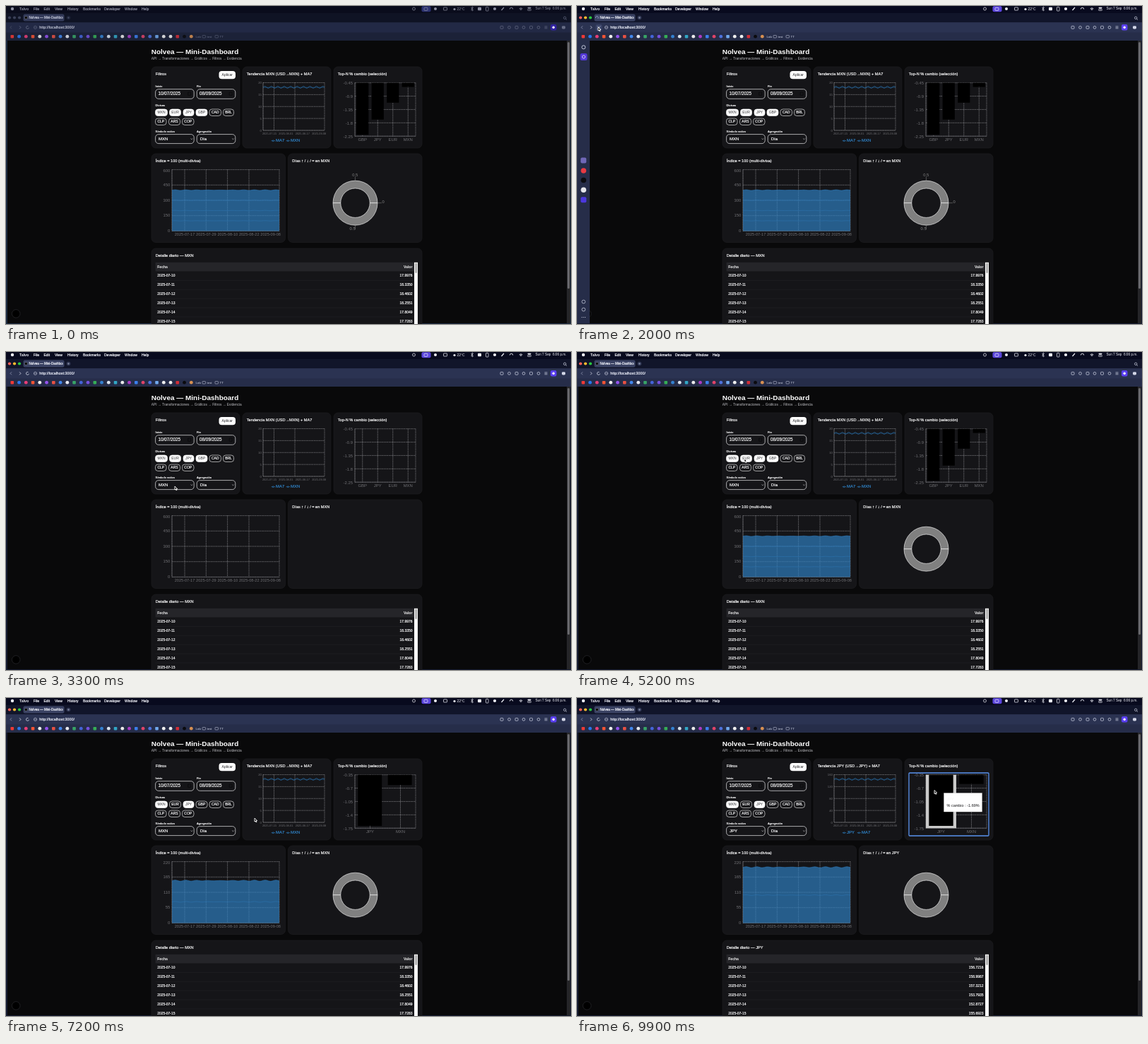
Animation, 800 px wide and 450 px high, one loop 10000 ms. Source, as an HTML page with a canvas:

```html
<!DOCTYPE html>
<html lang="es">
<head>
<meta charset="utf-8">
<title>Mini-Dashboard</title>
<style>
html, body { margin: 0; width: 100%; height: 100%; overflow: hidden; background: #09090a; }
canvas { display: block; width: 800px; height: 450px; }
</style>
</head>
<body>
<canvas id="stage"></canvas>
<script>
const canvas = document.getElementById('stage'), c = canvas.getContext('2d');
const ratio = window.devicePixelRatio || 1;
canvas.width = 800 * ratio;
canvas.height = 450 * ratio;

const LOOP = 10000, CLEARED = 2900, AXES = 3200, LOADED = 3300, FOCUS = 8300, PICK_JPY = 9400;
const BLUE = '#2f7fc1', CARD = '#151518', GRAY = '#707074', GRID = '#c4c4c8';
const CHANGE = { GBP: 2.2, JPY: 1.69, EUR: 1.12, MXN: .59 };
const SETS = [
  { at: LOADED, bars: ['GBP', 'JPY', 'EUR', 'MXN'], stack: ['MXN', 'EUR', 'JPY', 'GBP'], max: 600, step: .45 },
  { at: 5700, bars: ['GBP', 'JPY', 'MXN'], stack: ['MXN', 'JPY', 'GBP'], max: 300, step: .45 },
  { at: 7050, bars: ['JPY', 'MXN'], stack: ['MXN', 'JPY'], max: 220, step: .35 }
];
const CHIPS = [['MXN', 211.5, 17], ['EUR', 231.5, 16], ['JPY', 251, 15], ['GBP', 269, 16], ['CAD', 288, 16.5],
  ['BRL', 307.5, 15], ['CLP', 211.5, 15.5], ['ARS', 230.5, 16], ['COP', 249.5, 16.5]];
const ROWS = {
  MXN: ['17.9976', '18.3350', '18.4602', '18.2551', '17.8049', '17.7283'],
  JPY: ['156.7216', '158.9987', '157.3212', '153.7935', '152.8727', '155.6923']
};
const PATH = [[300, 330, 240], [900, 250, 150], [1800, 30, 30], [2200, 30, 30], [3200, 239, 190], [4600, 239, 190],
  [5100, 237, 151], [5800, 237, 151], [6500, 276, 150], [7050, 278, 151], [7200, 352, 170], [7500, 352, 170],
  [8200, 555.5, 126], [8700, 555.5, 126], [9300, 506, 130.5], [10000, 506, 130.5]];

const clamp = v => Math.max(0, Math.min(1, v));
const mix = (a, b, p) => a + (b - a) * p;

// cubic-bezier(.25, .1, .25, 1)
function ease(x) {
  x = clamp(x);
  if (x === 0 || x === 1) return x;
  let lo = 0, hi = 1, m;
  for (let i = 0; i < 20; i++) {
    m = (lo + hi) / 2;
    if (.75 * m * (1 - m) + m ** 3 < x) lo = m; else hi = m;
  }
  return .3 * m * (1 - m) ** 2 + 3 * m * m * (1 - m) + m ** 3;
}

function text(s, x, y, size, color = '#f4f4f5', { align = 'left', bold = false, medium = false } = {}) {
  c.font = `${bold ? 'bold ' : ''}${size}px "Liberation Sans", Arial, sans-serif`;
  c.textAlign = align;
  c.textBaseline = 'middle';
  c.fillStyle = color;
  c.fillText(s, x, y);
  if (medium) {
    c.strokeStyle = color;
    c.lineWidth = .2;
    c.strokeText(s, x, y);
  }
}
function box(x, y, w, h, r, fill, stroke, width = .7) {
  c.beginPath();
  c.roundRect(x, y, w, h, r);
  paint(fill, stroke, width);
}
function dot(x, y, r, fill, stroke, width = .7) {
  c.beginPath();
  c.arc(x, y, r, 0, 7);
  paint(fill, stroke, width);
}
function paint(fill, stroke, width) {
  if (fill) { c.fillStyle = fill; c.fill(); }
  if (stroke) { c.strokeStyle = stroke; c.lineWidth = width; c.stroke(); }
}
function line(points, color, width = .6, fill) {
  c.beginPath();
  points.forEach(([x, y]) => c.lineTo(x, y));
  paint(fill, color, width);
}
function clipped(x, y, w, h, draw) {
  c.save();
  c.beginPath();
  c.rect(x, y, w, h);
  c.clip();
  draw();
  c.restore();
}
function grid(x, y, w, h, columns) {
  c.setLineDash([1.4, 1]);
  for (let i = 0; i < 5; i++) line([[x, y + i * h / 4], [x + w, y + i * h / 4]], GRID, .5);
  for (const gx of [x, ...columns, x + w]) line([[gx, y], [gx, y + h]], GRID, .5);
  c.setLineDash([]);
  line([[x, y], [x, y + h], [x + w, y + h]], '#6a6a6e', .5);
}
const wave = day => .6 * Math.sin(day - .25) + .4 * Math.sin(day * 1.12 - .2);
const days = Array.from({ length: 61 }, (_, i) => i);

function cursorAt(t) {
  if (t < PATH[0][0]) return null;
  const i = PATH.findIndex(k => k[0] > t), a = PATH[i - 1], b = PATH[i];
  const p = clamp((t - a[0]) / (b[0] - a[0])), s = p * p * (3 - 2 * p);
  return [mix(a[1], b[1], s), mix(a[2], b[2], s)];
}

function menuBar(active) {
  c.fillStyle = active ? '#080a1e' : '#0a0c1c';
  c.fillRect(0, 0, 800, 10);
  const ink = active ? '#f2f3fa' : '#8e91a2';
  dot(9, 4, 2.2, ink);
  text('Talvo', 19, 4.2, 5.2, ink, { bold: true });
  const items = { File: 39, Edit: 53.5, View: 69, History: 87, Bookmarks: 109, Developer: 139, Window: 168, Help: 192 };
  for (const name in items) text(name, items[name], 4.2, 5, ink, { medium: true });
  box(588.5, .3, 13, 8, 2, active ? '#5b45dd' : '#2b3170');
  box(592, 2.3, 5, 4, 1, null, ink);
  dot(577.5, 4, 2, null, ink);
  dot(608, 4, 2, ink);
  box(619.5, 2, 5, 4, .5, null, ink);
  dot(635, 4.5, 1.6, ink);
  text('22°C', 638.5, 4.2, 5, ink);
  line([[658.5, 2], [661.5, 6], [660, 7], [660, 1], [661.5, 2], [658.5, 6]], ink, .6);
  box(668, 1.8, 5, 4.5, 1, ink);
  box(679.5, 1.5, 3.5, 5.5, .6, null, ink);
  dot(692, 4, 2.1, ink);
  line([[701.5, 6], [705, 2]], ink, 1.2);
  c.beginPath();
  c.arc(715.5, 4.5, 2.2, Math.PI, 0);
  paint(null, ink, .9);
  for (const r of [1, 2.2, 3.4]) {
    c.beginPath();
    c.arc(729, 6.3, r, -2.3, -.84);
    paint(null, ink, .8);
  }
  box(738.5, 1.7, 5, 1.8, .9, ink);
  box(738.5, 4.6, 5, 1.8, .9, null, ink);
  text('Sun 7 Sep  6:06 p.m.', 793.5, 4.2, 4.7, ink, { align: 'right' });
}

function browser(active, loading, t) {
  const ink = active ? '#d3d7e8' : '#666c85';
  c.fillStyle = active ? '#11152a' : '#0f1324';
  c.fillRect(0, 10, 800, 14);
  c.fillStyle = active ? '#262d49' : '#1c2238';
  c.fillRect(0, 23, 800, 26);
  c.fillStyle = active ? '#2b3352' : '#222945';
  c.fillRect(0, 23.5, 800, 14);
  ['#fe5f57', '#febc2e', '#28c840'].forEach((color, i) => dot(5 + 7 * i, 16.5, 2.1, active ? color : '#3a4058'));
  box(24.5, 11.5, 58, 10, 2.5, active ? '#3a4263' : '#333a59');
  if (loading) {
    c.beginPath();
    c.arc(28.3, 16.5, 1.9, t / 130, t / 130 + 4.3);
    paint(null, '#a9b2d8', .8);
  } else dot(28.3, 16.5, 2, '#050505', '#cccccc', .3);
  clipped(32, 11, 48.5, 11, () => text('Nolvea — Mini-Dashboard', 32.5, 16.7, 4.6, active ? '#f0f2fa' : '#c3c7d8', { medium: true }));
  dot(88.5, 16.5, 2.8, active ? '#343b58' : '#1d2338');
  text('+', 88.5, 16.4, 5, ink, { align: 'center' });
  dot(791.2, 16.8, 1.7, null, ink);
  line([[792.4, 18], [794, 19.6]], ink, .8);

  line([[8, 28.3], [6, 30.3], [8, 32.3]], active ? '#9299b4' : '#4b5168', .8);
  line([[19, 28.3], [21, 30.3], [19, 32.3]], ink, .8);
  if (loading) {
    box(26.5, 26, 9, 9, 2, '#3a4468');
    line([[29, 28.5], [33, 32.5]], ink, .8);
    line([[33, 28.5], [29, 32.5]], ink, .8);
  } else {
    c.beginPath();
    c.arc(30.5, 30.3, 2, .2, 5.3);
    paint(null, ink, .8);
  }
  dot(41.5, 30.3, 2.1, null, ink, .6);
  line([[39.5, 30.3], [43.5, 30.3]], ink, .4);
  text('http://localhost:3000/', 47.3, 30.4, 5.4, active ? '#e8ebf6' : '#b6bacb', { medium: true });
  [702, 712.5, 723, 733, 743.5, 754].forEach((x, i) =>
    i % 2 ? dot(x, 30.3, 1.9, null, ink) : box(x - 2, 28.4, 4, 3.8, .8, null, ink));
  for (const y of [28.8, 30.3, 31.8]) line([[762.5, y], [766.5, y]], ink, .6);
  box(771, 26, 8.5, 8.5, 2, active ? '#5a3ff0' : '#3022a0');
  dot(775.2, 30.3, 1.7, '#ffffff');
  box(787, 28.2, 5, 4.3, 1.4, ink);

  const tones = ['#f03a35', '#2877ee', '#e83e77', '#f25434', '#eeeeee', '#9353ee', '#e75143', '#4287ed', '#e6e8ee',
    '#38a466', '#4464d8', '#7450dc', '#35ad56', '#3481d1', '#dce4ef', '#32a7c6', '#eaeaea', '#ac3bc4', '#3b7fed',
    '#df4368', '#4d72dd', '#71a9ed', '#eeeeee', '#eeeeee', '#d22d36', '#0b0b0e', '#d68f51'];
  if (!active) c.globalAlpha = .85;
  tones.forEach((tone, i) => {
    const x = 8.8 + 9.75 * i;
    i % 3 ? dot(x, 43.2, 2.4, tone) : box(x - 2.3, 41, 4.6, 4.4, .8, tone);
  });
  c.globalAlpha = 1;
  [['Lab', 268.5], ['test', 278], ['TT', 296]].forEach(([name, x], i) => {
    if (i) box(x, 41.5, 4.5, 3.5, .7, null, ink, .5);
    text(name, i ? x + 6.5 : x, 43.3, 4.4, ink);
  });
}

function sideBar(t) {
  const shown = clamp((t - 1500) / 200) * (1 - clamp((t - 2500) / 200));
  if (!shown) return;
  c.save();
  c.translate(-18 * (1 - shown), 0);
  c.fillStyle = '#262d49';
  c.fillRect(0, 49, 18, 400);
  dot(9.3, 58.3, 2.5, null, '#d3d7e8', .9);
  box(4.5, 67, 10, 10, 2.5, '#5237d8');
  dot(9.5, 72, 2.1, null, '#ffffff');
  box(5.2, 214.5, 8, 8, 2, '#7068b8');
  dot(9.3, 233, 3.8, '#e83a42');
  dot(9.3, 246.5, 3.8, '#0b0c10');
  dot(9.3, 260.3, 3.8, '#e6e7eb');
  box(5.3, 270.3, 8, 8, 2, '#4c38df');
  dot(9.3, 418.5, 2.4, null, '#d3d7e8');
  dot(9.3, 429.5, 2.4, null, '#d3d7e8');
  for (const x of [7, 9.3, 11.6]) dot(x, 440.5, .6, '#d3d7e8');
  c.restore();
}

function card(x, y, w, h, title) {
  box(x, y, w, h, 6, CARD, '#202024', .6);
  text(title, x + 5.8, y + 10.5, 5.6, '#f4f4f5', { medium: true });
}

function filters(set, symbol) {
  card(206, 86, 125, 115, 'Filtros');
  box(301.5, 92, 23.5, 11.2, 4, '#ffffff');
  text('Aplicar', 313.2, 97.7, 5, '#202024', { align: 'center' });
  const labels = [['Inicio', 211.6, 113.5], ['Fin', 270, 113.5], ['Divisas', 211.6, 140.5],
    ['Símbolo activo', 211.6, 177.7], ['Agregación', 270, 177.7]];
  for (const [s, x, y] of labels) text(s, x, y, 4.2, '#f4f4f5', { medium: true });
  [['10/07/2025', symbol, 211.6], ['08/09/2025', 'Día', 270.2]].forEach(([date, choice, x]) => {
    box(x, 117.7, 54.6, 13.6, 4.3, null, '#e8e8ea');
    text(date, x + 3.8, 124.6, 6.3, '#f4f4f5', { medium: true });
    box(x + 46, 122, 4, 4.4, .5, null, '#060607', .6);
    box(x, 181.6, 54.6, 13, 4.3, null, '#e8e8ea');
    text(choice, x + 4.5, 188.2, 6, '#f4f4f5', { medium: true });
    line([[x + 50, 187.5], [x + 51.3, 188.8], [x + 52.6, 187.5]], '#e8e8ea', .6);
  });
  CHIPS.forEach(([name, x, w], i) => {
    const on = set.stack.includes(name), y = i < 6 ? 146 : 159;
    box(x, y, w, 9.4, 3.6, on ? '#ffffff' : null, on ? '#ffffff' : '#dededf');
    text(name, x + w / 2, y + 4.9, 5, on ? '#303034' : '#f4f4f5', { align: 'center', medium: !on });
  });
}

function legend(name, x) {
  line([[x, 190.7], [x + 5, 190.7]], BLUE, .8);
  dot(x + 2.5, 190.7, .9, CARD, BLUE);
  text(name, x + 6.3, 190.8, 5.9, BLUE, { medium: true });
}

function trend(symbol, p) {
  const yen = symbol === 'JPY', top = yen ? 160 : 20;
  grid(364, 108.5, 87, 67.5, [379.5, 409]);
  for (let i = 0; i < 5; i++) text(top * (4 - i) / 4, 362, 109 + i * 67.5 / 4, 4.3, GRAY, { align: 'right' });
  ['2025-07-15', '2025-08-01', '2025-08-17', '2025-09-08'].forEach((s, i) =>
    text(s, 373 + 23.4 * i, 180.6, 3.95, GRAY, { align: 'center' }));
  clipped(363, 100, 88 * p, 80, () => {
    line(days.map(d => [364 + d * 1.45, 115.2 - .12 * wave(d + 3)]), '#245f93', .5);
    line(days.map(d => [364 + d * 1.45, 115 - 1.25 * Math.sin(d - .25)]), BLUE, .7);
  });
  (yen ? ['JPY', 'MA7'] : ['MA7', 'MXN']).forEach((name, i) => legend(name, 375.8 + 21 * i));
}

const barRects = set => set.bars.map((name, i) => {
  const band = 86 / set.bars.length;
  return [494 + band * (i + .1), band * .8, (CHANGE[name] - set.step) / (4 * set.step) * 75.5];
});

function topChart(set, before, age, pointer, t) {
  const band = 86 / set.bars.length;
  const inside = pointer && t > 7600 && pointer[0] > 494 && pointer[0] < 580 && pointer[1] > 108 && pointer[1] < 184;
  const hover = inside ? Math.floor((pointer[0] - 494) / band) : -1;
  grid(494, 108.7, 86, 75.5, set.bars.map((_, i) => 494 + band * (i + .5)));
  for (let i = 0; i < 5; i++)
    text(+(-(i + 1) * set.step).toFixed(2), 491, 109.7 + i * 18.8, 5.9, GRAY, { align: 'right' });
  set.bars.forEach((name, i) => text(name, 494 + band * (i + .5), 189.3, 5.9, GRAY, { align: 'center' }));
  if (hover >= 0) {
    c.fillStyle = '#cacaca';
    c.fillRect(494 + band * hover, 108.7, band, 75.5);
  }
  const p = ease(age / (before ? 200 : 400)), old = before && barRects(before);
  c.fillStyle = '#000000';
  barRects(set).forEach((rect, i) => {
    const from = old ? old[i] : [rect[0], rect[1], 0];
    const [x, w, h] = rect.map((v, k) => mix(from[k], v, p));
    c.fillRect(x, 108.7, w, h);
  });
  if (t >= FOCUS) box(470, 106, 113, 89, 1, null, '#5a93ee', 1.3);
  if (hover < 0) return;
  const mid = 494 + band * (hover + .5), x = hover ? mid - 58 : mid + 4, y = pointer[1] + 4;
  box(x, y, 54, 26.5, 0, '#ffffff', '#d0d0d0', .4);
  text(set.bars[hover], x + 4, y + 8.5, 5.6, '#f4f4f5');
  text(`% cambio : -${CHANGE[set.bars[hover]]}%`, x + 4, y + 17.6, 5.5, '#18181a');
}

function index(set, before, age) {
  const y0 = 231.6, h = 86.8, base = y0 + h;
  grid(235, y0, 152, h, [253, 283.3, 313.6, 344]);
  for (let i = 0; i < 5; i++)
    text(set.max * (4 - i) / 4, 232.3, (i ? y0 : y0 + 1.6) + i * h / 4, 5.9, GRAY, { align: 'right' });
  ['2025-07-17', '2025-07-29', '2025-08-10', '2025-08-22', '2025-09-08'].forEach((s, i) =>
    text(s, 253 + 30.4 * i, 323.5, 5.6, GRAY, { align: 'center' }));
  const level = (s, name) => (s.stack.indexOf(name) + 1) * 100 / s.max;
  const p = ease(age / 1500);
  const curves = set.stack.map((name, j) => {
    const top = mix(before ? level(before, name) : level(set, name), level(set, name), p);
    return days.map(d => [235 + d * 152 / 60, base - h * top - (.4 + .2 * j) * wave(d) * 300 / Math.max(set.max, 220)]);
  });
  clipped(234, 230, 154 * (before ? 1 : p), 90, () => {
    c.globalAlpha = .68;
    line([[235, base], ...curves.at(-1), [387, base]], null, 0, BLUE);
    c.globalAlpha = 1;
    curves.forEach((curve, j) => line(curve, j === curves.length - 1 ? BLUE : '#2d75b0', .6));
  });
}

function pie(p, labels) {
  const x = 494.5, y = 278.7, turn = Math.PI * p;
  if (p > 0) for (const i of [0, 1]) {
    c.beginPath();
    c.arc(x, y, 31.5, -i * turn, -(i + 1) * turn, true);
    c.arc(x, y, 20.7, -(i + 1) * turn, -i * turn);
    c.closePath();
    paint('#808080', '#ffffff', .6);
  }
  if (!labels) return;
  line([[494.4, 247], [494.4, 241.5]], '#909090', .5);
  line([[526, 278.7], [532, 278.7]], '#909090', .5);
  line([[494.4, 310.3], [494.4, 316]], '#909090', .5);
  text('0.5', 494.3, 238.9, 5.8, '#858585', { align: 'center' });
  text('0', 534, 277.3, 5.8, '#858585', { align: 'center' });
  text('0.5', 490.6, 315.4, 5.8, '#858585', { align: 'center' });
}

function table(symbol) {
  card(206, 343, 383, 120, `Detalle diario — ${symbol}`);
  c.fillStyle = '#252529';
  c.fillRect(211.6, 362.8, 367, 12.6);
  text('Fecha', 214.2, 369.2, 5.1, '#f4f4f5', { bold: true });
  text('Valor', 575.4, 369.2, 5.1, '#f4f4f5', { bold: true, align: 'right' });
  ROWS[symbol].forEach((value, i) => {
    const y = 381.9 + 12.9 * i;
    text(`2025-07-${10 + i}`, 214.2, y, 4.95, '#f4f4f5', { medium: true });
    text(value, 575.4, y, 4.95, '#f4f4f5', { medium: true, align: 'right' });
    line([[211.6, y + 6.4], [578, y + 6.4]], '#242428', .5);
  });
  c.fillStyle = '#f8f8f8';
  c.fillRect(578, 362.8, 5, 88);
  box(579.3, 363.5, 2.6, 14.5, 1.3, '#a9a9a9');
}

function page(t, pointer) {
  const set = SETS.filter(s => s.at <= t).at(-1) || SETS[0], before = SETS[SETS.indexOf(set) - 1];
  const age = t < CLEARED ? 1e4 : t - set.at;
  const symbol = t < PICK_JPY ? 'MXN' : 'JPY';
  c.fillStyle = '#09090a';
  c.fillRect(2, 49, 796, 400);
  text('Nolvea — Mini-Dashboard', 205.8, 64.8, 9.98, '#ffffff', { bold: true });
  text('API → Transformaciones → Gráficos → Filtros → Evidencia', 205.8, 74.4, 4.82, '#c0c0c5');
  filters(set, symbol);
  card(335, 86, 125, 115, `Tendencia ${symbol} (USD→${symbol}) + MA7`);
  card(464, 86, 125, 115, 'Top-N % cambio (selección)');
  card(206, 209, 189.5, 125.5, 'Índice = 100 (multi-divisa)');
  card(399.5, 209, 189.5, 125.5, `Días ↑ / ↓ / = en ${symbol}`);
  if (t < CLEARED || t >= AXES) {
    const first = t < CLEARED;
    trend(symbol, first ? 1 : ease((t - LOADED) / 1500));
    topChart(set, before, age, pointer, t);
    index(set, before, age);
    pie(first ? 1 : ease((t - LOADED - 400) / 1500), first || (t >= 5300 && t < SETS[1].at));
  }
  table(symbol);
  dot(14.2, 435.4, 5.8, '#000000', '#2c2c30', .7);
  c.fillStyle = '#252528';
  c.fillRect(794, 49, 5, 400);
  box(795, 51, 3, 349, 1.5, '#68686c');
}

function arrow([x, y]) {
  const shape = [[0, 0], [0, 5], [1.2, 4], [2, 5.8], [2.9, 5.4], [2.1, 3.7], [3.7, 3.6], [0, 0]];
  line(shape.map(([dx, dy]) => [x + dx, y + dy]), '#ffffff', .9, '#000000');
}

function draw() {
  const t = Math.floor(performance.now() % LOOP / 100) * 100;
  const active = t >= 500, pointer = cursorAt(t);
  c.setTransform(ratio, 0, 0, ratio, 0, 0);
  c.fillStyle = active ? '#141a30' : '#1b2a40';
  c.fillRect(0, 0, 800, 450);
  page(t, pointer);
  menuBar(active);
  browser(active, t >= 1900 && t < AXES, t);
  sideBar(t);
  if (pointer) arrow(pointer);
  requestAnimationFrame(draw);
}
draw();
</script>
</body>
</html>
```
